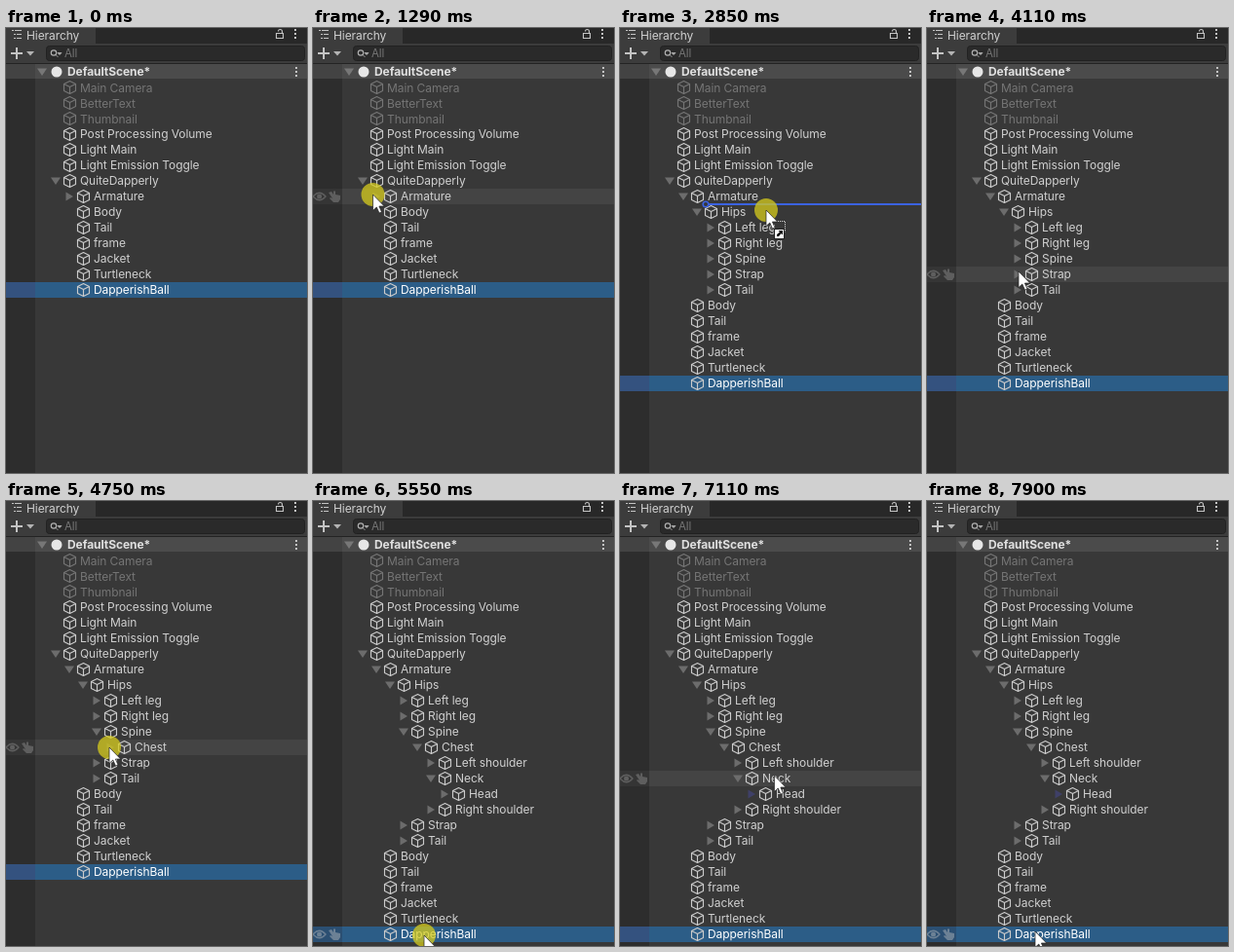
Write an HTML page that moves like this. It is 309 by 457 pixels and loops after 8 s.

```html
<!DOCTYPE html>
<html lang="en">
<head>
<meta charset="utf-8">
<title>Hierarchy panel</title>
<style>
  html, body { margin: 0; width: 100%; height: 100%; overflow: hidden; background: #383838; }
  svg { display: block; width: 309px; height: 457px; }
  text { font: 12px Inter, "Open Sans", sans-serif; letter-spacing: -.07px; fill: #d0d0d0; white-space: pre; }
  .bold { font-weight: 700; }
  .dim text { fill: #757575; transform: translateY(.6px); }
  .dim .cube { stroke: #757575; }
  .cube { fill: none; stroke: #cbcbcb; stroke-width: 1.15; stroke-linejoin: round; }
  .fold { fill: #6c6c6c; }
  .sel text { fill: #fff; }
  .icons { fill: none; stroke: #5e5e5e; stroke-width: 1.3; }
  .icons .solid { fill: #5e5e5e; stroke: none; }
  .on.icons { stroke: #6c8195; }
  .on.icons .solid { fill: #6c8195; }
</style>
</head>
<body>
<svg viewBox="0 0 309 457">
  <rect width="309" height="457" fill="#383838"/>
  <rect y="37" width="30" height="420" fill="#2d2d2d"/>

  <!-- tab bar -->
  <rect width="309" height="16" fill="#282828"/>
  <rect width="92" height="16" fill="#3c3c3c"/>
  <path d="M6 2.500h2M9 2.500h7M8 6.500h2M11 6.500h5M8 10.500h2M11 10.500h5" stroke="#c4c4c4" stroke-width="1.2"/>
  <text x="21" y="11.500">Hierarchy</text>
  <path d="M277.500 5.500h7v5h-7zM283.500 5.500V3.500a2 2 0 0 0-4 0" fill="none" stroke="#c4c4c4" stroke-width="1.1"/>
  <path d="M296 1h2v2h-2zM296 5h2v2h-2zM296 9h2v2h-2z" fill="#c4c4c4"/>

  <!-- toolbar -->
  <rect y="16" width="309" height="21" fill="#3c3c3c"/>
  <path d="M5 26h12M11 20v12" stroke="#c4c4c4" stroke-width="2"/>
  <path d="M21 24h8l-4 4.500z" fill="#b4b4b4"/>
  <rect x="41.500" y="18.500" width="265" height="15" rx="3" fill="#2a2a2a" stroke="#212121"/>
  <circle cx="49" cy="25.500" r="2.700" fill="none" stroke="#b0b0b0" stroke-width="1.200"/>
  <path d="M51 27.500l2.500 2.500M53 25.500h4l-2 2z" stroke="#b0b0b0" stroke-width=".8" fill="#b0b0b0"/>
  <text x="60" y="30" style="fill:#767676;font-size:11.500px">All</text>
  <rect y="36" width="309" height="1" fill="#232323"/>

  <!-- scene header -->
  <rect y="37" width="309" height="15" fill="#4b4b4b"/>
  <rect y="37" width="30" height="15" fill="#434343"/>
  <path class="fold" d="M32 41.500h10l-5 7.500z" style="fill:#777"/>
  <circle cx="52" cy="45" r="5.500" fill="#e6e6e6"/>
  <text class="bold" x="63" y="49" style="fill:#e0e0e0">DefaultScene*</text>
  <path d="M297 40h2v2h-2zM297 44h2v2h-2zM297 48h2v2h-2z" fill="#c4c4c4"/>

  <g id="hover">
    <rect width="309" height="16" fill="#444"/>
    <rect width="30" height="16" fill="#353535"/>
  </g>
  <g id="select">
    <rect width="309" height="16" fill="#2c5d87"/>
    <rect id="gutter" width="30" height="16"/>
  </g>
  <g id="rows"></g>
  <g id="icons" class="icons">
    <path d="M0 8Q6.500 .5 13 8Q6.500 15.500 0 8z"/>
    <circle class="solid" cx="6.500" cy="8" r="2.500"/>
    <path class="solid" d="M16 4l3-1 2 3V2.500h2V6l5 1v4l-2 3h-5l-4-4 1-1 2 1z"/>
  </g>
  <g id="line" fill="none" stroke="#3b62e0" stroke-width="2">
    <circle r="2.800" stroke-width="1.600"/>
    <path d="M3 0H309"/>
  </g>
  <circle id="press" r="12" fill="#d6cb1c" opacity=".75"/>
  <g id="cursor">
    <g id="drag" transform="translate(-1 1)">
      <path d="M7 10.500H20.500V21H7z" fill="none" stroke="#ddd" stroke-dasharray="1 1"/>
      <rect x="9.500" y="18.500" width="10" height="10" fill="#fff" stroke="#222"/>
      <path d="M12 26v-2l3-2.500-1.500-1.500H18v4.500l-1.500-1.500L14 26z" fill="#111"/>
    </g>
    <path d="M0 0V16.500L3.800 13 6.500 19 9 18 6.400 12H11.700z" fill="#fff" stroke="#222" stroke-width=".7"/>
  </g>
</svg>
<script>
const LOOP = 8000, ROW = 16, TOP = 53;
const $ = id => document.getElementById(id);
const place = (el, x, y) => el.setAttribute('transform', `translate(${x} ${y})`);
const show = (el, on) => { el.style.display = on ? '' : 'none'; };

// [label, depth, fold: time it opens, -1 always open, Infinity never, undefined has no arrow]
const tree = [
  ['Main Camera', 0], ['BetterText', 0], ['Thumbnail', 0],
  ['Post Processing Volume', 0], ['Light Main', 0], ['Light Emission Toggle', 0],
  ['QuiteDapperly', 0, -1],
  ['Armature', 1, 1360], ['Hips', 2, 1670],
  ['Left leg', 3, Infinity], ['Right leg', 3, Infinity],
  ['Spine', 3, 4600], ['Chest', 4, 4790],
  ['Left shoulder', 5, Infinity], ['Neck', 5, 4990], ['Head', 6, Infinity],
  ['Right shoulder', 5, Infinity],
  ['Strap', 3, Infinity], ['Tail', 3, Infinity],
  ['Body', 1], ['Tail', 1], ['frame', 1], ['Jacket', 1], ['Turtleneck', 1],
  ['DapperishBall', 1]
];

const rows = tree.map(([label, depth, fold], i) => {
  const el = document.createElementNS('http://www.w3.org/2000/svg', 'g');
  const x = 76 + 14 * depth;
  if (i < 3) el.setAttribute('class', 'dim');
  if (i === tree.length - 1) el.setAttribute('class', 'sel');
  el.innerHTML =
    (fold === undefined ? '' : '<path class="fold"/>') +
    `<path class="cube" transform="translate(${x - 10.5} 8)"
      d="M0-6.500L6-3.500V3.500L0 6.500L-6 3.500V-3.500zM-6-3.500L0-.5L6-3.500M0-.5V6.500"/>
    <text x="${x}" y="12.200">${label}</text>`;
  $('rows').append(el);
  return { el, x, depth, fold, label, arrow: el.querySelector('.fold') };
});
const ball = rows[rows.length - 1];
const head = rows.find(r => r.label === 'Head');

// [start, end, x, y]
const start = [132, 420];
const moves = [
  [620, 1060, 61.5, 171], [1420, 1560, 78, 188], [1700, 2050, 104, 368],
  [2290, 2850, 150, 187], [3520, 3670, 132, 258], [3930, 4110, 94, 250],
  [4200, 4360, 93, 240], [4620, 4710, 106, 253], [4810, 4910, 120, 285],
  [5010, 5330, 114, 446], [5590, 6190, 152, 282], [7080, 7210, 197, 282],
  [7420, 7890, 111, 442]
];
const presses = [[1260, 1400], [1600, 1690], [2260, 3200], [4530, 4620],
  [4730, 4800], [4930, 5000], [5550, 6790]];
const drags = [[2320, 3230], [5620, 6820]];
const within = (spans, t) => spans.some(([a, b]) => t >= a && t < b);
const ease = u => u * u * (3 - 2 * u);

function pointer(t) {
  let [x, y] = start;
  for (const [a, b, nx, ny] of moves) {
    if (t < a) break;
    const u = ease(Math.min(1, (t - a) / (b - a)));
    x += (nx - x) * u;
    y += (ny - y) * u;
  }
  return [x, y];
}

function layout(t) {
  const visible = [];
  let closed = Infinity;
  for (const r of rows) {
    const on = r.depth <= closed;
    show(r.el, on);
    if (!on) continue;
    const open = t >= r.fold;
    closed = r.fold !== undefined && !open ? r.depth : Infinity;
    r.y = TOP + ROW * visible.length;
    place(r.el, 0, r.y);
    if (r.arrow) {
      const x = r.x - 25;
      r.arrow.setAttribute('d', open ? `M${x - 5} 4.500h10l-5 7.500z` : `M${x - 3.5} 3.500v9l7.500-4.500z`);
    }
    visible.push(r);
  }
  return visible;
}

function render(t) {
  const visible = layout(t);
  const [x, y] = pointer(t);
  const dragging = within(drags, t);
  const present = t >= 620;
  const under = visible[Math.floor((y - TOP) / ROW)];
  const hot = present && !dragging && !(t >= 6820 && t < 7080) && under;

  show($('hover'), hot);
  show($('icons'), hot);
  if (hot) {
    place($('hover'), 0, hot.y);
    place($('icons'), 0, hot.y);
    $('icons').setAttribute('class', hot === ball ? 'icons on' : 'icons');
  }
  place($('select'), 0, ball.y);
  $('gutter').setAttribute('fill', hot === ball ? '#2b4f72' : '#34527f');
  head.arrow.style.fill = t >= 6100 ? '#3f4068' : '';

  const gap = dragging && under && y - under.y < 12;
  show($('line'), gap);
  if (gap) place($('line'), under.x - 16, under.y);

  show($('press'), within(presses, t));
  place($('press'), x, y);
  show($('cursor'), present);
  show($('drag'), dragging);
  place($('cursor'), x, y);
}

const origin = performance.now();
function tick() {
  render((performance.now() - origin) % LOOP);
  requestAnimationFrame(tick);
}
tick();
</script>
</body>
</html>
```
